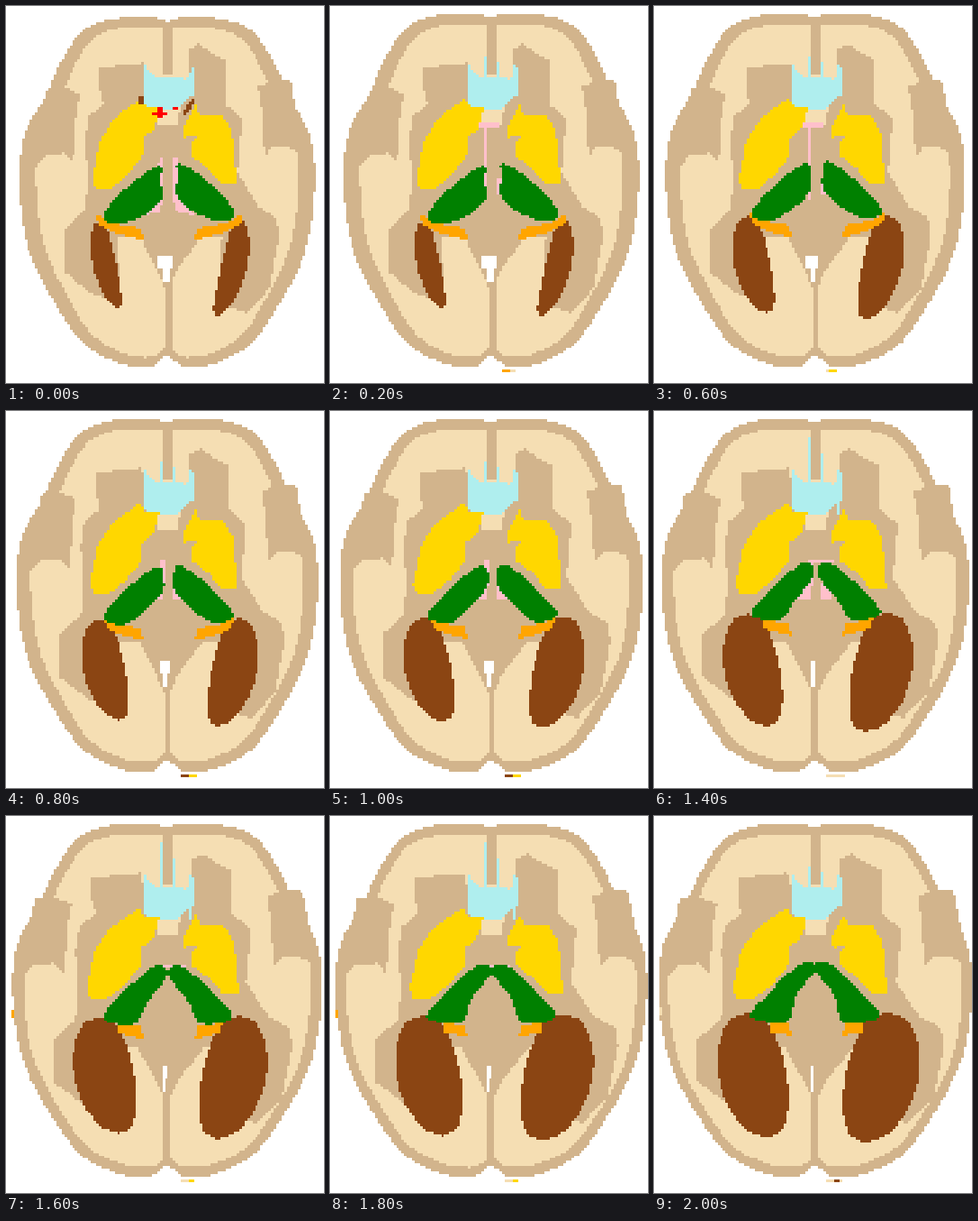
An HTML page with a canvas that plays this animation: 353x418 px, repeating every 2.2 s.

```html
<!DOCTYPE html>
<html lang="en">
<head>
<meta charset="utf-8">
<title>Brain section</title>
<style>
html, body { margin: 0; width: 100%; height: 100%; overflow: hidden; background: #fff; }
canvas { display: block; width: 100vw; height: 100vh; image-rendering: pixelated; }
</style>
</head>
<body>
<canvas id="stage" width="353" height="418"></canvas>
<script>
const ctx = document.getElementById('stage').getContext('2d');
const W = 353, H = 418, CELL = W / 120, ROWS = 142;
const MID = 179, STEP = 200, STEPS = 11;
const TAN = '#d2b48c', WHEAT = '#f5deb3', BROWN = '#8b4513', ORANGE = '#ffa500', GOLD = '#ffd700',
  BLUE = '#afeeee', GREEN = '#008000', PINK = '#ffc0cb', WHITE = '#ffffff', RED = '#ff0000';

// Key points; most are given for the left side and mirrored.
const pts = text => text.trim().split(/\s+/).map(p => p.split(',').map(Number));
const half = pts(`179,13 165,9 120,10 85,24 60,60 45,95 20,142 15,200 25,268 52,325 85,373 125,396
  160,400 179,388`);
const fissure = pts('46,92 64,90 82,98 78,122 77,145 74,174 65,163 43,166 30,182');
const core = pts(`152,63 104,68 104,92 108,108 92,122 88,150 90,175 90,205 88,226 65,248 65,295
  97,320 128,328 123,257 150,257 167,293 179,320 190,293 215,257 240,255 236,330 268,341 293,312
  303,255 300,235 280,222 257,185 262,125 243,108 243,60 225,50 214,42 203,48 203,82 156,82`);
const septum = pts('164,112 194,112 190,132 168,132');
const horn = pts('154,65 160,74 167,79 200,81 208,68 208,98 190,115 160,113 154,107');
const goldLeft = pts(`150,102 156,112 170,113 168,124 163,138 152,146 152,165 135,188 117,202 100,203
  96,192 104,150 120,124`);
const goldRight = pts(`210,109 214,120 240,121 251,140 256,198 240,198 224,180 205,165 205,152 212,144
  198,146 196,136`);
const thalamus = [
  pts('169,177 171,196 173,212 153,232 122,242 108,232 130,205'),
  pts('162,164 181,166 172,180 157,200 148,228 107,222 128,196')];
const edge = [
  pts('100,230 114,240 150,247 153,260 122,252 102,242'),
  pts('128,228 135,229 149,230 153,244 140,241 130,240')];
const wedge = pts('170,168 174,168 174,215 170,228 150,233 162,215');

const mix = (a, b, u) => a + (b - a) * u;
const blend = ([a, b], u) => a.map((p, i) => p.map((v, k) => mix(v, b[i][k], u)));
const mirror = (points, dx = 0, dy = 0) => points.map(([x, y]) => [2 * MID - x + dx, y + dy]);
const widen = (points, k) => points.map(([x, y]) => [mix(MID, x, k), y]);

// Closed Catmull-Rom curve through the key points.
function smooth(points) {
  const n = points.length, out = [];
  for (let i = 0; i < n; i++) {
    const [a, b, c, d] = [n - 1, 0, 1, 2].map(k => points[(i + k) % n]);
    for (let t = 0; t < 1; t += 0.2) {
      out.push([0, 1].map(k => b[k] + t / 2 * (c[k] - a[k] +
        t * (2 * a[k] - 5 * b[k] + 4 * c[k] - d[k] + t * (3 * (b[k] - c[k]) + d[k] - a[k])))));
    }
  }
  return out;
}

// Scanline fill on the coarse grid, with hard edges.
function fill(points, color) {
  const snap = x => Math.round(Math.round(x / CELL) * CELL);
  ctx.fillStyle = color;
  for (let row = 0; row < ROWS; row++) {
    const y = (row + 0.5) * CELL, hits = [];
    points.forEach(([x1, y1], i) => {
      const [x2, y2] = points[(i + 1) % points.length];
      if ((y1 <= y) !== (y2 <= y)) hits.push(x1 + (y - y1) / (y2 - y1) * (x2 - x1));
    });
    hits.sort((a, b) => a - b);
    const top = Math.round(row * CELL), h = Math.round((row + 1) * CELL) - top;
    for (let i = 0; i + 1 < hits.length; i += 2) {
      const left = snap(hits[i]);
      ctx.fillRect(left, top, snap(hits[i + 1]) - left, h);
    }
  }
}
const box = (color, x, y, w, h) => fill([[x, y], [x + w, y], [x + w, y + h], [x, y + h]], color);

function both(points, color, dx, dy) {
  fill(points, color);
  fill(mirror(points, dx, dy), color);
}

// A bent, blunt-ended lobe: a curved spine with a swelling width.
function ventricle(x, bend, top, bottom, width) {
  const side = sign => Array.from({ length: 25 }, (_, i) => {
    const s = i / 24;
    return [x + bend * s * s + sign * width * Math.sin(Math.PI * s) ** 0.4, mix(top, bottom, s)];
  });
  fill([...side(-1), ...side(1).reverse()], BROWN);
}

function random(seed) {
  return () => {
    seed = (seed * 16807) % 2147483647;
    return seed / 2147483647;
  };
}

// Stray cells at the border of the section.
function flecks(step) {
  const rnd = random(977 * (1 + (step >> 1)));
  const colors = [WHEAT, ORANGE, GOLD, BROWN, WHEAT];
  const pick = () => colors[Math.floor(rnd() * colors.length)];
  for (let i = 0; i < 1 + step / 3; i++) box(pick(), 190 + rnd() * 18, 403, 8, 3);
  if (step > 7) box(pick(), 5, 195 + rnd() * 20, 3, 10);
}

function cortex(step, u) {
  const squash = step ? 1 : 0.99;
  const outer = smooth(widen([...half, ...mirror(half).reverse().slice(1, -1)], mix(1, 1.06, u)))
    .map(([x, y]) => [x, mix(403, y, squash)]);
  fill(outer, TAN);
  fill(widen(outer, mix(0.885, 0.94, u)).map(([x, y]) => [x, mix(205, y, 0.945)]), WHEAT);
  both(widen(fissure, mix(1, 1.13, u)), TAN, 4, -8);
  box(TAN, 174, 18, 10, 58);
  box(TAN, 177 - 3 * u, 300, 7, 88);
  fill(widen(core, mix(1, 1.15, u)), TAN);
  fill(septum, WHEAT);
}

function pinkParts(step) {
  if (step === 0) both(wedge, PINK, 2);
  if (step > 0 && step < 4) {
    box(PINK, 170, 130, 4, 85);
    box(PINK, 165, 130, 24, 5);
  }
  if (step > 0 && step < 8) both(pts('160,196 174,190 174,210 160,210'), PINK);
  if (step > 3 && step < 8) box(PINK, 170, 165, 6, 30);
  if (step > 5 && step < 10) box(PINK, 172, 165, 28, 4);
}

function draw(step) {
  const u = Math.max(0, step - 1) / (STEPS - 2), swell = u ** 0.8;
  ctx.fillStyle = WHITE;
  ctx.fillRect(0, 0, W, H);
  cortex(step, u);

  const slit = mix(17, 3, u);
  box(WHITE, 176 - slit / 2, 276, slit, 14);
  box(WHITE, 174 - u, 288, mix(8, 3, u), 17);

  ventricle(104, 21, mix(238, 218, u), mix(336, 357, u), mix(13, 38, swell));
  ventricle(259, -24, mix(236, 217, u), mix(344, 362, u), mix(14, 41, swell));
  both(blend(edge, u), ORANGE, 4);

  fill(horn, BLUE);
  const tall = step > 5 && step < 10 ? 26 : 0;
  if (step) [172, 184, 204].forEach((x, i) => box(BLUE, x, 56 + 5 * i - tall * (1 - i / 2), 3, 24 + tall));

  fill(widen(goldLeft, mix(1, 1.1, u)), GOLD);
  fill(widen(goldRight, mix(1, 1.04, u)), GOLD);
  pinkParts(step);
  both(smooth(blend(thalamus, u)), GREEN, mix(4, 0, u), mix(-3, 0, u));

  if (step) flecks(step);
  else {
    box(RED, 163, 117, 17, 4);
    box(RED, 169, 112, 5, 12);
    box(RED, 184, 111, 6, 4);
    box(BROWN, 146, 101, 7, 9);
    fill(pts('195,118 206,104 210,104 206,112 198,122'), BROWN);
  }
}

const begin = performance.now();
let shown = -1;
function tick() {
  const step = Math.floor((performance.now() - begin) / STEP) % STEPS;
  if (step !== shown) draw(shown = step);
  requestAnimationFrame(tick);
}
tick();
</script>
</body>
</html>
```
